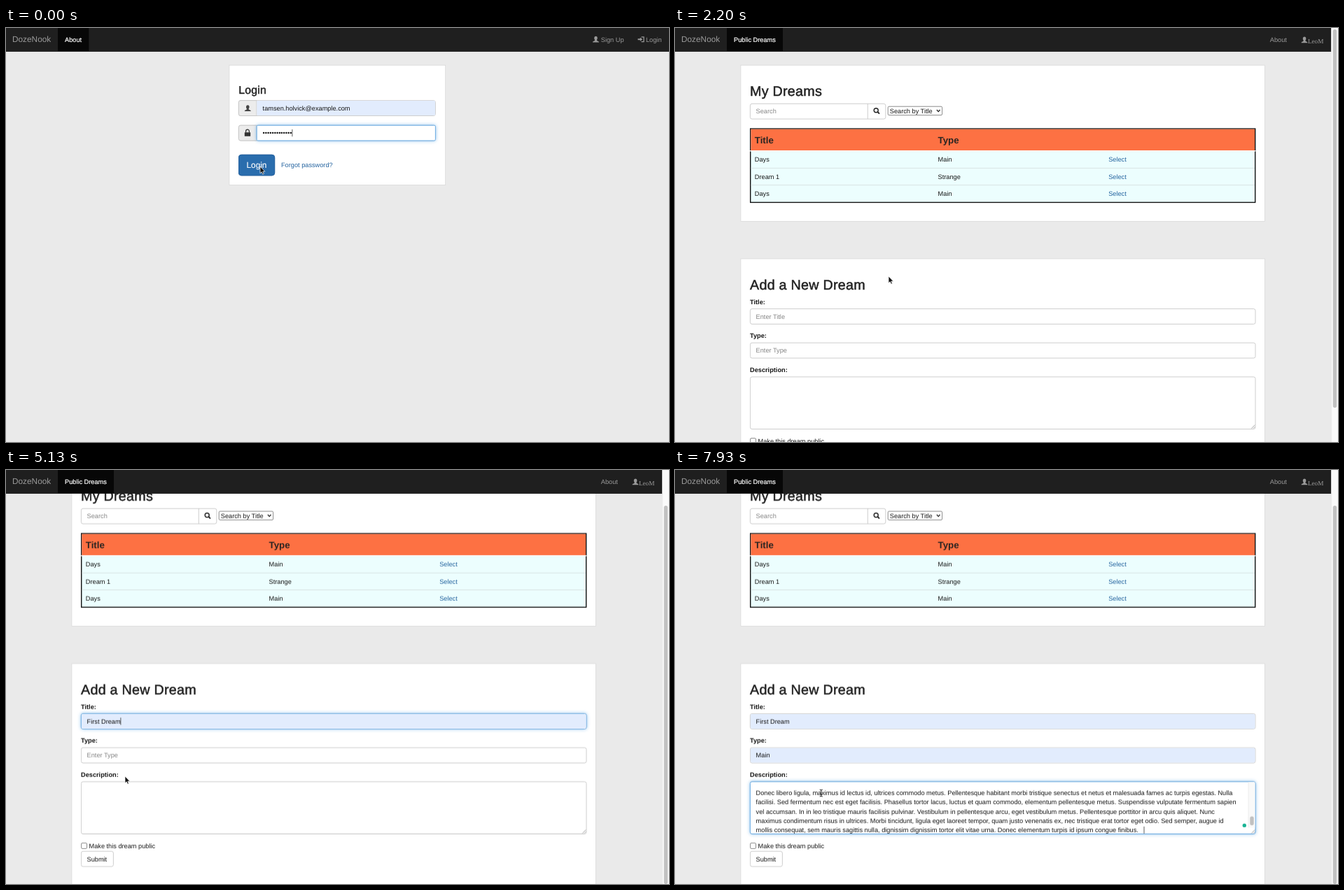
An HTML page for the animation above (8 s loop, 947 by 592 pixels).

```html
<!DOCTYPE html>
<html lang="en">
<head>
<meta charset="utf-8">
<title>Dream journal</title>
<style>
html, body { margin: 0; width: 100%; height: 100%; overflow: hidden; background: #eaeaea; }
svg { display: block; }
text { font: 9.21px "Liberation Sans", Arial, sans-serif; fill: #161616; text-rendering: geometricPrecision; white-space: pre; }
.panel { fill: #fff; stroke: #d9d9d9; stroke-width: .8; }
.box { fill: #fff; stroke: #c2c2c2; stroke-width: .8; }
.addon { fill: #ececec; stroke: #c2c2c2; stroke-width: .8; }
.ring { fill: #fff; stroke: #62a8e2; stroke-width: .9; filter: drop-shadow(0 0 2.4px rgba(90, 165, 230, .7)); }
.auto { fill: #e2ecfd; }
.caret { fill: #333; }
.hint { fill: #858585; }
.link { fill: #24639f; }
.nav { fill: #9a9a9a; }
.tab { fill: #fff; stroke: #fff; stroke-width: .22; }
.brand { font-size: 11.84px; fill: #9a9a9a; }
.head { fill: #222; stroke: #222; stroke-width: .5; letter-spacing: .26px; }
.h2 { font-size: 19.73px; }
.h3 { font-size: 15.78px; }
.bold { font-weight: bold; }
.th { font-size: 13.3px; font-weight: bold; fill: #2b2522; }
.btn { font-size: 11.84px; fill: #fff; stroke: #fff; stroke-width: .15; }
.user { font-family: "Liberation Serif", Times, serif; fill: #9a9a9a; }
.menu rect { fill: #232427; }
.menu .hot { fill: #434447; }
.menu text { font: 600 8.4px Inter, sans-serif; fill: #f4f4f4; }
.menu { filter: drop-shadow(0 1px 2px rgba(0, 0, 0, .3)); }

/* percentages are milliseconds / 80 */
.k { animation: 8s step-end infinite; }
.login { animation-name: login; }
.idle { animation-name: idle; }
.entry { animation-name: entry; }
.pressed { animation-name: pressed; }
.status { animation-name: status; }
.home { animation-name: home; }
.scroll { animation-name: scroll; }
.thumb { animation-name: thumb; }
.on-title { animation-name: on-title; }
.on-type { animation-name: on-type; }
.on-text { animation-name: on-text; }
.title-auto { animation-name: title-auto; }
.type-auto { animation-name: type-auto; }
.type-hint { animation-name: type-hint; }
.title-caret { animation-name: title-caret; }
.type-caret { animation-name: type-caret; }
.choice { animation-name: choice; }
.menu1 { animation-name: menu1; }
.menu2 { animation-name: menu2; }
.hot1 { animation-name: hot1; }
.hot2 { animation-name: type-auto; }
.empty { animation-name: empty; }
.pasted { animation-name: pasted; }
.arrow { animation-name: arrow; }
.beam { animation-name: beam; }
.pointer { animation: move 8s linear infinite; }

@keyframes login { 0% { opacity: 1 } 17.5% { opacity: 0 } }
@keyframes home { 0% { opacity: 0 } 17.5% { opacity: 1 } }
@keyframes idle { 0% { opacity: 1 } .875% { opacity: 0 } }
@keyframes entry { 0% { opacity: 1 } 7.5% { opacity: 0 } }
@keyframes pressed { 0% { opacity: 0 } 7.5% { opacity: 1 } }
@keyframes status { 0% { opacity: 0 } 8.34% { opacity: 1 } 25% { opacity: 0 } }
@keyframes scroll { 0% { transform: none } 33.375% { transform: translateY(-26px) } 34.125% { transform: translateY(-53.2px) } }
@keyframes thumb { 0% { transform: none } 33.375% { transform: translateY(24px) } 34.125% { transform: translateY(49px) } }
@keyframes on-title { 0% { opacity: 0 } 43.75% { opacity: 1 } 71.625% { opacity: 0 } }
@keyframes on-type { 0% { opacity: 0 } 71.625% { opacity: 1 } 90.875% { opacity: 0 } }
@keyframes on-text { 0% { opacity: 0 } 90.875% { opacity: 1 } }
@keyframes title-auto { 0% { opacity: 0 } 48.375% { opacity: 1 } }
@keyframes type-auto { 0% { opacity: 0 } 73.375% { opacity: 1 } }
@keyframes type-hint { 0% { opacity: 1 } 73.375% { opacity: 0 } }
@keyframes title-caret { 0% { transform: none } 64.125% { transform: translateX(48px) } }
@keyframes type-caret { 0% { transform: none } 80.875% { transform: translateX(20.2px) } }
@keyframes menu1 { 0% { opacity: 0 } 44.125% { opacity: 1 } 64.125% { opacity: 0 } }
@keyframes menu2 { 0% { opacity: 0 } 72.5% { opacity: 1 } 80.875% { opacity: 0 } }
@keyframes empty { 0% { opacity: 1 } 95.875% { opacity: 0 } }
@keyframes pasted { 0% { opacity: 0 } 95.875% { opacity: 1 } }
@keyframes choice {
  0% { transform: none } 48.375% { transform: translateY(-22px) } 50.875% { transform: translateY(-44px) }
  54.125% { transform: translateY(-66px) } 55.875% { transform: translateY(-88px) } 57.5% { transform: translateY(-66px) }
  59.125% { transform: translateY(-88px) } 60.875% { transform: translateY(-66px) }
}
@keyframes hot1 {
  0% { opacity: 0 } 48.375% { opacity: 1; transform: none } 50.875% { opacity: 1; transform: translateY(23.75px) }
  54.125% { opacity: 1; transform: translateY(47.5px) } 55.875% { opacity: 1; transform: translateY(71.25px) }
  57.5% { opacity: 1; transform: translateY(95px) } 59.125% { opacity: 1; transform: translateY(71.25px) }
  60.875% { opacity: 1; transform: translateY(47.5px) }
}
@keyframes arrow { 0% { opacity: 1 } 42.5% { opacity: 0 } 47.5% { opacity: 1 } 67.5% { opacity: 0 } 73.375% { opacity: 1 } 89.375% { opacity: 0 } }
@keyframes beam { 0% { opacity: 0 } 42.5% { opacity: 1 } 47.5% { opacity: 0 } 67.5% { opacity: 1 } 73.375% { opacity: 0 } 89.375% { opacity: 1 } }
@keyframes move {
  0%, 8.34% { transform: translate(363px, 198px) }
  15.875% { transform: translate(561px, 206px) }
  17.5% { transform: translate(574px, 216px) }
  27.5%, 29.125% { transform: translate(305px, 355px) }
  31.625%, 37.5% { transform: translate(295.5px, 346px) }
  43.75% { transform: translate(185px, 360px) }
  46.25% { transform: translate(172px, 364px) }
  48.375% { transform: translate(169px, 388px) }
  52.5%, 53.5% { transform: translate(169px, 406px) }
  54.125% { transform: translate(169px, 428px) }
  58.375% { transform: translate(170px, 482px) }
  59.125% { transform: translate(170px, 462px) }
  60.875%, 64.125% { transform: translate(170px, 438px) }
  69.125%, 71.625% { transform: translate(170px, 411px) }
  75%, 87.5% { transform: translate(170.5px, 430px) }
  90.875% { transform: translate(204px, 456px) }
  94.125%, 100% { transform: translate(208.7px, 462px) }
}
</style>
</head>
<body>
<svg width="947" height="592" viewBox="0 0 947 592">
  <defs>
    <path id="person" d="M0 8.6C0 6.7 3.2 6.8 3.2 5.4 1.6 3.4 1.9 0 4.5 0S7.4 3.4 5.8 5.4C5.8 6.8 9 6.7 9 8.6Z"/>
    <path id="grip" d="M0 5L5 0M2.6 5L5 2.6" stroke="#888" stroke-width=".7"/>
  </defs>
  <rect width="947" height="592" fill="#eaeaea"/>

  <g class="k login">
    <rect width="947" height="33.5" fill="#1f1f1f"/>
    <rect y="33" width="947" height=".7" fill="#0b0b0b"/>
    <rect x="74" width="44.3" height="33" fill="#070707"/>
    <text class="brand" x="9" y="20.4">DozeNook</text>
    <text class="tab" x="84" y="19.8">About</text>
    <use href="#person" x="838" y="11.8" fill="#9a9a9a"/>
    <text class="nav" x="849.8" y="19.8">Sign Up</text>
    <g fill="none" stroke="#9a9a9a" stroke-width="1.3">
      <path d="M907.5 12.8H911V19.6H907.5"/>
      <path d="M902.5 16.2H906.5" stroke-width="2"/>
      <path d="M905.8 13.4L909 16.2 905.8 19Z" fill="#9a9a9a" stroke="none"/>
    </g>
    <text class="nav" x="914" y="19.8">Login</text>

    <rect class="panel" x="318.9" y="53.2" width="308.8" height="171.2"/>
    <text class="head h3" x="332.2" y="94.3">Login</text>

    <rect class="box" x="332.4" y="103.7" width="281" height="21.8" rx="2.6"/>
    <path class="addon" d="M358 103.7H335a2.6 2.6 0 0 0-2.6 2.6V122.9a2.6 2.6 0 0 0 2.6 2.6H358Z"/>
    <rect class="auto" x="358.4" y="104.1" width="254.6" height="21" rx="1"/>
    <use href="#person" x="340.8" y="110.3" fill="#444"/>
    <text x="366.6" y="117.9">tamsen.holvick@example.com</text>

    <rect class="box" x="332.4" y="139.2" width="281" height="21.8" rx="2.6"/>
    <path class="addon" d="M358 139.2H335a2.6 2.6 0 0 0-2.6 2.6V158.4a2.6 2.6 0 0 0 2.6 2.6H358Z"/>
    <rect x="340.8" y="149.2" width="8.4" height="5.6" rx=".6" fill="#333"/>
    <path d="M342.6 149.5V147.6a2.4 2.4 0 0 1 4.8 0V149.5" fill="none" stroke="#333" stroke-width="1.3"/>
    <rect class="k entry ring" x="358.2" y="139.2" width="255.2" height="21.8" rx="1.6"/>
    <text x="366.6" y="153.2" fill="#444">•••••••••••••</text>
    <rect class="k entry caret" x="408.5" y="145" width=".8" height="10.2"/>

    <rect x="332.4" y="181.3" width="51.3" height="29.6" rx="3.8" fill="#235f97" stroke="#1d5487" stroke-width=".7"/>
    <rect class="k idle" x="332.4" y="181.3" width="51.3" height="29.6" rx="3.8" fill="#2a6dad" stroke="#2560a0" stroke-width=".7"/>
    <g class="k pressed">
      <rect x="332.6" y="181.5" width="50.9" height="29.2" rx="3.4" fill="#b9d2ee" stroke="#4a8bd0" stroke-width="1.5"/>
      <rect x="334" y="182.9" width="48.1" height="26.4" rx="2.4" fill="#205587" stroke="#153a60" stroke-width=".9"/>
    </g>
    <text class="btn" x="343.5" y="200.2">Login</text>
    <text class="link" x="393" y="198.8">Forgot password?</text>
  </g>

  <g class="k home">
    <rect width="947" height="592" fill="#eaeaea"/>
    <g class="k scroll">
      <rect class="panel" x="93.9" y="53.2" width="748.6" height="223.3"/>
      <text class="head h2" x="107" y="97.4">My Dreams</text>
      <rect class="box" x="107.4" y="108.3" width="193.4" height="21.8" rx="2.6"/>
      <path d="M275.3 108.3V130.1" stroke="#c2c2c2" stroke-width=".8"/>
      <text class="hint" x="115.6" y="122.4">Search</text>
      <circle cx="287.2" cy="117.8" r="3" fill="none" stroke="#222" stroke-width="1.4"/>
      <path d="M289.4 120L292 122.6" stroke="#222" stroke-width="1.8"/>
      <rect x="304.2" y="112.2" width="77.4" height="12.4" rx="1.6" fill="#fff" stroke="#6f6f6f" stroke-width=".8"/>
      <text x="306.8" y="121.6">Search by Title</text>
      <path d="M373.9 117L376.2 119.6 378.5 117" fill="none" stroke="#222" stroke-width="1.3"/>

      <rect x="107.7" y="144" width="721" height="105.4" fill="#ecfefe" stroke="#111" stroke-width="1.4"/>
      <rect x="108.4" y="144.7" width="719.6" height="30.4" fill="#fd7143"/>
      <rect x="106.6" y="175.1" width="723" height="1.3" fill="#fff"/>
      <text class="th" x="113.8" y="164.6">Title</text>
      <text class="th" x="375.6" y="164.6">Type</text>
      <g id="dreams"></g>

      <rect class="panel" x="93.9" y="330" width="748.6" height="340"/>
      <text class="head h2" x="107" y="374.2">Add a New Dream</text>

      <text class="bold" x="107" y="394.7">Title:</text>
      <rect class="box" x="107.4" y="401.6" width="721.6" height="21.8" rx="2.6"/>
      <rect class="k on-title ring" x="107.4" y="401.6" width="721.6" height="21.8" rx="2.6"/>
      <rect class="k title-auto auto" x="107.9" y="402.1" width="720.6" height="20.8" rx="2"/>
      <svg x="108" y="402" width="700" height="21">
        <g class="k choice">
          <text class="hint" x="7.6" y="13.6">Enter Title</text>
          <text x="7.6" y="35.6">Days</text>
          <text x="7.6" y="57.6">a</text>
          <text x="7.6" y="79.6">First Dream</text>
          <text x="7.6" y="101.6">First Dream 2</text>
        </g>
      </svg>
      <g class="k on-title"><rect class="k title-caret caret" x="115.5" y="407.3" width=".8" height="10.4"/></g>

      <text class="bold" x="107" y="443.4">Type:</text>
      <rect class="box" x="107.4" y="450.2" width="721.6" height="21.8" rx="2.6"/>
      <rect class="k on-type ring" x="107.4" y="450.2" width="721.6" height="21.8" rx="2.6"/>
      <rect class="k type-auto auto" x="107.9" y="450.7" width="720.6" height="20.8" rx="2"/>
      <text class="k type-hint hint" x="115.6" y="464.4">Enter Type</text>
      <text class="k type-auto" x="115.6" y="464.4">Main</text>
      <g class="k on-type"><rect class="k type-caret caret" x="115.5" y="456" width=".8" height="10.4"/></g>

      <text class="bold" x="107" y="492">Description:</text>
      <rect class="box" x="107.4" y="498.9" width="721.6" height="74.6" rx="2.6"/>
      <rect class="k on-text ring" x="107.4" y="498.9" width="721.6" height="74.6" rx="2.6"/>
      <g class="k on-text"><rect class="k empty caret" x="115.5" y="504" width=".8" height="10.4"/></g>
      <g class="k pasted">
        <g id="story"></g>
        <rect x="819" y="499.5" width="9.4" height="65" fill="#f9f9f9"/>
        <path d="M819 499.5V564.5" stroke="#e6e6e6" stroke-width=".7"/>
        <rect x="821.3" y="548.6" width="5.4" height="12.6" rx="2.6" fill="#c1c1c1"/>
        <circle cx="813.3" cy="561.4" r="2.7" fill="#18b394"/>
        <rect class="caret" x="669.6" y="563" width=".8" height="9.8"/>
      </g>
      <use href="#grip" x="823.3" y="567.6"/>

      <rect x="107.6" y="586.6" width="7.9" height="7.9" rx="1.4" fill="#fff" stroke="#6f6f6f" stroke-width=".8"/>
      <text x="118.5" y="594.4">Make this dream public</text>
      <rect class="box" x="107.4" y="598.4" width="46" height="21.8" rx="2.6"/>
      <text x="115.5" y="612.5">Submit</text>
    </g>

    <rect width="937.5" height="33.5" fill="#1f1f1f"/>
    <rect y="33" width="937.5" height=".7" fill="#0b0b0b"/>
    <rect x="74" width="80" height="33" fill="#070707"/>
    <text class="brand" x="9" y="20.4">DozeNook</text>
    <text class="tab" x="84" y="19.8">Public Dreams</text>
    <text class="nav" x="849.8" y="19.8">About</text>
    <use href="#person" x="894.6" y="12.6" fill="#9a9a9a"/>
    <text class="user" x="903.9" y="21.6">LeoM</text>
    <rect x="937.4" width="9.6" height="592" fill="#fafafa"/>
    <rect x="937.4" width=".7" height="592" fill="#e4e4e4"/>
    <rect class="k thumb" x="939.8" y="2" width="5.4" height="541" rx="2.7" fill="#c1c1c1"/>
    <g class="k menu1"><g class="menu" id="titles"></g></g>
    <g class="k menu2"><g class="menu" id="types"></g></g>
  </g>

  <g class="k status">
    <path d="M0 580.3H311.6a2.8 2.8 0 0 1 2.8 2.8V592H0Z" fill="#2a2b2f"/>
    <text x="2.8" y="590" style="font-size:8.43px;fill:#dedede">Waiting for dream-log-app.herokuapp.com...</text>
  </g>

  <g class="pointer">
    <path class="k arrow" d="M0 0V9.8L2.2 7.8 3.7 11.2 5.4 10.4 3.9 7.2H6.9Z" fill="#111" stroke="#fff" stroke-width=".7"/>
    <g class="k beam" fill="none">
      <path id="bar" d="M-2-5Q0-5 0-3.6V3.6Q0 5-2 5M2-5Q0-5 0-3.6M0 3.6Q0 5 2 5M-1.2 1.6H1.2" stroke="#111" stroke-width="1"/>
    </g>
  </g>
</svg>
<script>
const fill = (id, html) => { document.getElementById(id).innerHTML = html; };
const label = (x, y, s, cls = "") => `<text class="${cls}" x="${x}" y="${y}">${s}</text>`;

fill("dreams", [["Days", "Main"], ["Dream 1", "Strange"], ["Days", "Main"]].map(([title, type], i) => {
  const y = 191.4 + i * 24.4;
  const rule = i ? `<rect x="108.4" y="${y - 15.9}" width="719.6" height=".8" fill="#d5dede"/>` : "";
  return rule + label(113.8, y, title) + label(375.6, y, type) + label(619.2, y, "Select", "link");
}).join(""));

const menu = (y, hot, items) =>
  `<rect x="107" y="${y}" width="126.4" height="152.4" rx="2.4"/>
   <rect class="k hot ${hot}" x="107" y="${y + 5}" width="126.4" height="23.75"/>` +
  items.map((s, i) => label(115, y + 20.3 + i * 23.75, s)).join("");
fill("titles", menu(371, "hot1", ["Days", "a", "First Dream", "First Dream 2", "First Dream", "Dream 1"]));
fill("types", menu(419.8, "hot2", ["Main", "work", "Weird", "a", "First Dream1", "First Dream"]));

fill("story", [
  "Donec libero ligula, maximus id lectus id, ultrices commodo metus. Pellentesque habitant morbi tristique senectus et netus et malesuada fames ac turpis egestas. Nulla",
  "facilisi. Sed fermentum nec est eget facilisis. Phasellus tortor lacus, luctus et quam commodo, elementum pellentesque metus. Suspendisse vulputate fermentum sapien",
  "vel accumsan. In in leo tristique mauris facilisis pulvinar. Vestibulum in pellentesque arcu, eget vestibulum metus. Pellentesque porttitor in arcu quis aliquet. Nunc",
  "maximus condimentum risus in ultrices. Morbi tincidunt, ligula eget laoreet tempor, quam justo venenatis ex, nec tristique erat tortor eget odio. Sed semper, augue id",
  "mollis consequat, sem mauris sagittis nulla, dignissim dignissim tortor elit vitae urna. Donec elementum turpis id ipsum congue finibus."
].map((s, i) => label(115.6, 518.2 + i * 13.15, s)).join(""));
</script>
</body>
</html>
```
